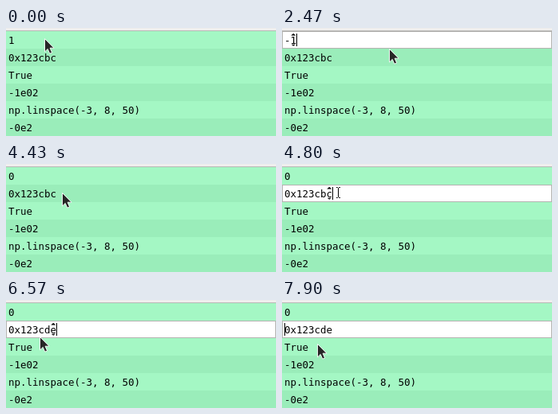
Recreate the animation shown at these times as an HTML page. Size 338x136 px, loop 8 s.

```html
<!DOCTYPE html>
<html lang="en">
<head>
<meta charset="utf-8">
<title>Editable value list</title>
<style>
  html, body { margin: 0; width: 100%; height: 100%; overflow: hidden; background: #efeeed; }
  svg { display: block; width: 338px; height: 136px; }
  text { font: 12.46px "DejaVu Sans Mono", monospace; white-space: pre; fill: #000; }
</style>
</head>
<body>
<svg viewBox="0 0 338 136">
  <rect width="338" height="3" fill="#efeeed"/>
  <rect y="3" width="338" height="1" fill="#b9b8b6"/>
  <g id="rows"></g>
  <rect id="frame" x=".5" y="4.5" width="337" height="21" fill="none" stroke="#b4b3b1"/>
  <g id="marks">
    <path d="M-3 9.6L0 6.8L3 9.6Z"/>
    <path d="M-2.5 20.8L0 22.8L2.5 20.8Z"/>
  </g>
  <rect id="caret" width="1" height="16"/>
  <path id="arrow" d="M.5 .5V17L4.2 13.4L6.7 19.2L9.6 18L7.1 12.2H12Z" fill="#262626" stroke="#fff" stroke-width=".9"/>
  <g id="beam" fill="none">
    <path id="bar" d="M-2.5-6.5H-1L0-5.5L1-6.5H2.5M0-5.5V5.5M-2.5 6.5H-1L0 5.5L1 6.5H2.5" stroke="#fff" stroke-width="2.4"/>
    <use href="#bar" style="display:none"/>
    <path d="M-2.5-6.5H-1L0-5.5L1-6.5H2.5M0-5.5V5.5M-2.5 6.5H-1L0 5.5L1 6.5H2.5" stroke="#000"/>
  </g>
</svg>
<script>
const LOOP = 8000, TOP = 4, ROW = 22, LEFT = 3, CHAR = 7.5;
const values = ['1', '0x123cbc', 'True', '-1e02', 'np.linspace(-3, 8, 50)', '-0e2'];
const byId = id => document.getElementById(id);
const [frame, marks, caret, arrow, beam] = ['frame', 'marks', 'caret', 'arrow', 'beam'].map(byId);

function add(tag, attrs) {
  const el = document.createElementNS('http://www.w3.org/2000/svg', tag);
  for (const k in attrs) el.setAttribute(k, attrs[k]);
  return byId('rows').appendChild(el);
}

const rows = values.map((value, i) => {
  const y = TOP + ROW * i, fill = i % 2 ? '#9aedba' : '#a4f7c4';
  return {
    fill,
    back: add('rect', { y, width: 338, height: ROW, fill }),
    select: add('rect', { x: LEFT, y: y + 3, height: 16, fill: '#2f80b2' }),
    label: add('text', { x: LEFT, y: y + 16 }),
  };
});

const clamp = (v, lo, hi) => Math.max(lo, Math.min(hi, v));
const ease = p => p * p * (3 - 2 * p);
const show = (el, on) => el.setAttribute('visibility', on ? 'visible' : 'hidden');
const move = (el, x, y) => el.setAttribute('transform', `translate(${x} ${y})`);

// Key presses so far when a key repeats every `gap` ms.
const presses = (t, from, gap, max) => clamp(Math.floor((t - from) / gap) + 1, 0, max);

// Up and down keys pressed on the first value.
const keys = '++-----+++-';
function number(t) {
  const done = [...keys.slice(0, presses(t, 1430, 205, keys.length))];
  return String(done.reduce((n, key) => n + Number(key + 1), 1));
}

// A held key raises the hex value by 34 in 24 repeats.
const hex = t => '0x' + (0x123cbc + Math.round(presses(t, 5600, 34.7, 24) * 34 / 24)).toString(16);

// Pointer moves: from ms, to ms, x, y
const moves = [
  [0, 0, 48, 13], [430, 630, 51, 16], [800, 1100, 134, 26], [4000, 4330, 70, 36],
  [4800, 5130, 101, 44], [5600, 6400, 88, 46], [6470, 6570, 42, 46],
  [7200, 7500, 80, 52], [7500, 7900, 44, 55],
];
function pointer(t) {
  let x = 0, y = 0;
  for (const [from, to, tx, ty] of moves) {
    const p = ease(clamp((t - from) / (to - from || 1), 0, 1)) || Number(to === 0);
    x += (tx - x) * p;
    y += (ty - y) * p;
  }
  return [Math.round(x), Math.round(y)];
}

function draw(t) {
  const active = t >= 4630 ? 1 : t >= 630 && t < 4330 ? 0 : -1;
  const editing = active >= 0;
  const selected = editing && t < (active ? 4800 : 900);
  const texts = [number(t), hex(t), ...values.slice(2)];

  rows.forEach((row, i) => {
    const chosen = selected && i === active;
    row.label.textContent = texts[i];
    row.label.style.fill = chosen ? '#fff' : '#000';
    row.back.setAttribute('fill', i === active ? '#fff' : row.fill);
    row.select.setAttribute('width', Math.round(texts[i].length * CHAR));
    show(row.select, chosen);
  });

  const index = active === 1 ? 8 - presses(t, 6670, 80, 8) : texts[0].length;
  const top = ROW * Math.max(active, 0);
  move(frame, 0, top);
  move(caret, Math.round(LEFT + index * CHAR), top + 7);
  move(marks, LEFT + (index - 0.5) * CHAR, top);
  show(frame, editing);
  show(caret, editing);
  show(marks, editing && !selected && (active === 0 || index > 2));

  const [x, y] = pointer(t);
  const inside = editing && y >= TOP + top && y < TOP + top + ROW - 2;
  move(arrow, x, y);
  move(beam, x + 0.5, y);
  show(arrow, !inside);
  show(beam, inside);
}

const start = performance.now();
function tick(now) {
  draw(Math.max(0, now - start) % LOOP);
  requestAnimationFrame(tick);
}
draw(0);
requestAnimationFrame(tick);
</script>
</body>
</html>
```
